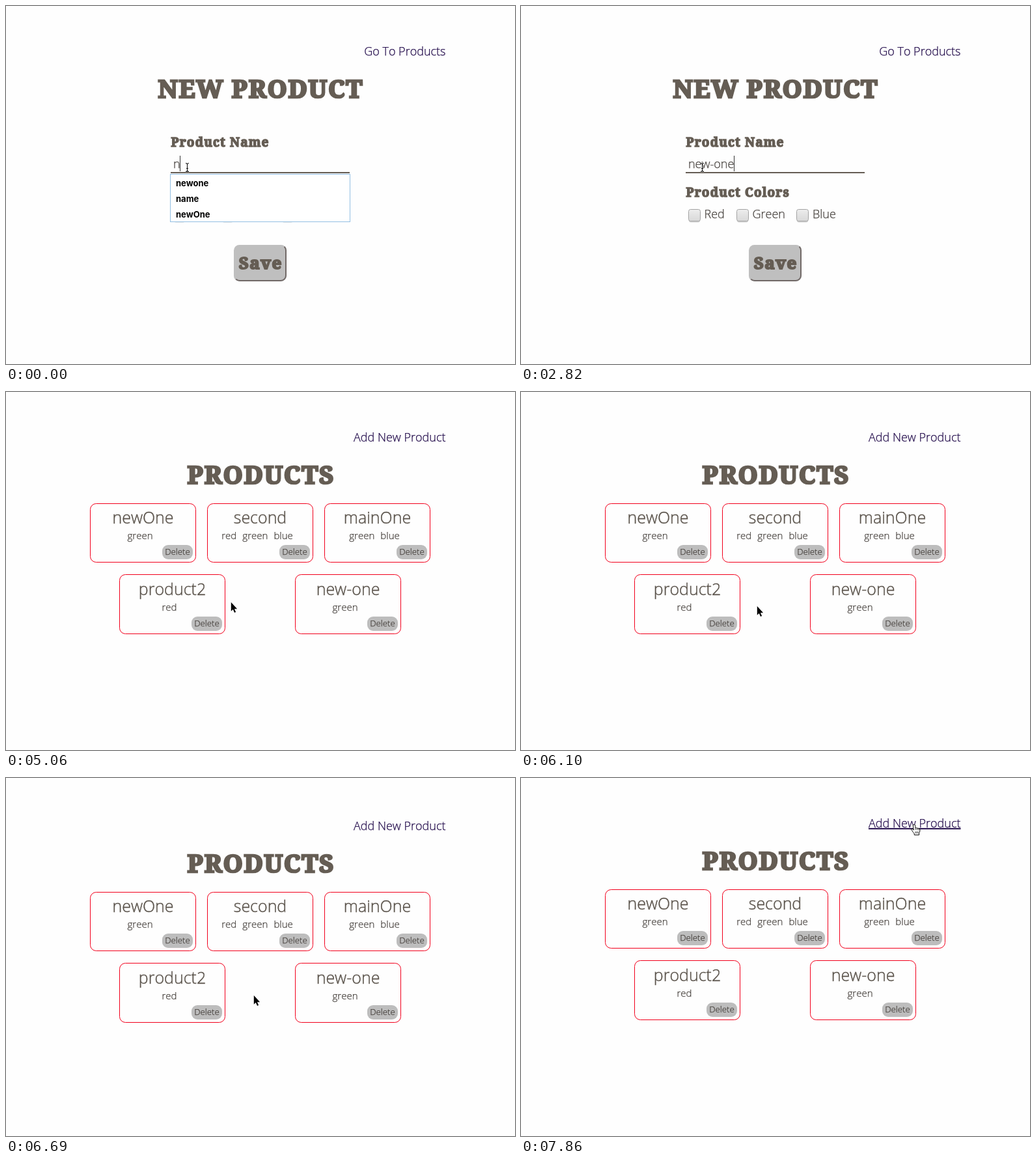
An HTML page for the animation above (8 s loop, 782 px wide and 550 px high).

```html
<!DOCTYPE html>
<html lang="en">
<head>
<meta charset="utf-8">
<title>Product form</title>
<style>
  html, body { margin: 0; width: 100%; height: 100%; overflow: hidden; background: #fefefe; }
  svg { display: block; width: 782px; height: 550px; }
  text { font: 300 18px "Open Sans", "Noto Sans", sans-serif; font-kerning: none; fill: #443f3b; stroke: #443f3b; stroke-width: .25px; }
  .slab { font-family: "Noto Serif", "Liberation Serif", serif; font-weight: 700; fill: #655d54; stroke: #655d54; }
  .head { font-size: 38.5px; stroke-width: 2.7px; letter-spacing: 1.6px; text-anchor: middle; }
  .label { font-size: 19px; stroke-width: 1.5px; letter-spacing: 1.15px; }
  .save { font-size: 26px; stroke-width: 2.1px; letter-spacing: 1.4px; text-anchor: middle; }
  .link { fill: #210a4a; stroke: #210a4a; text-anchor: end; }
  .link.hover { text-decoration: underline; }
  .item { font: 700 13px Inter, "Liberation Sans", sans-serif; fill: #000; stroke: none; }
  .title { font-size: 25px; fill: #5c554d; stroke: #5c554d; stroke-width: .45px; text-anchor: middle; }
  .tags { font-size: 15px; word-spacing: 5.2px; text-anchor: middle; }
  .delete { font-size: 13.3px; text-anchor: middle; }
  .card { fill: none; stroke: #f2001c; }
</style>
</head>
<body>
<svg viewBox="0 0 782 550">
  <defs>
    <linearGradient id="shade" x2="0" y2="1">
      <stop stop-color="#eee"/>
      <stop offset=".5" stop-color="#e2e2e2"/>
      <stop offset="1" stop-color="#d9d9d9"/>
    </linearGradient>
    <g id="box">
      <rect x="1" y="2" width="17" height="18.5" rx="3" fill="#d2d2d2"/>
      <rect x=".5" y=".5" width="18" height="18" rx="3" fill="url(#shade)" stroke="#a3a3a3"/>
    </g>
  </defs>

  <g id="form">
    <text class="link" x="675.5" y="76">Go To Products</text>
    <text class="slab head" x="391.3" y="140.7">NEW PRODUCT</text>
    <text class="slab label" x="253.5" y="216.3">Product Name</text>
    <text id="field" x="257" y="249"></text>
    <rect id="caret" y="230" width="1" height="24" fill="#333"/>
    <rect x="253" y="255" width="275" height="2" fill="#655d54"/>
    <text class="slab label" x="253.5" y="293.3">Product Colors</text>
    <use href="#box" x="257" y="312"/>
    <use href="#box" x="331" y="312"/>
    <use href="#box" x="423" y="312"/>
    <path id="tick" d="M334.7 321.3l4 4.2 7.8-10" fill="none" stroke="#3d3d3d" stroke-width="3.4"/>
    <text x="281.5" y="326">Red</text>
    <text x="355.5" y="326">Green</text>
    <text x="448" y="326">Blue</text>
    <rect x="350" y="367" width="81" height="56" rx="8.5" fill="#bfbfbf"/>
    <path d="M427.6 369.7A8 8 0 0 1 430 375.5V414a8 8 0 0 1-8 8H359a8 8 0 0 1-5.7-2.4" fill="none" stroke="#716967" stroke-width="2"/>
    <text class="slab save" x="391.2" y="403.5">Save</text>
    <g id="menu">
      <rect id="panel" x="252.5" y="258.5" width="276" fill="#fff" stroke="#93bfe3"/>
      <text class="item" x="261" y="277">newone</text>
      <text class="item" id="extra" x="261" y="301">name</text>
      <text class="item" id="last" x="261">newOne</text>
    </g>
  </g>

  <g id="list">
    <text class="link" id="add" x="675.5" y="76">Add New Product</text>
    <text class="slab head" x="391.8" y="140.7">PRODUCTS</text>
    <g id="cards"></g>
  </g>

  <path id="arrow" d="M.8 1V14.8l3-2.8 2.2 4.9 2.1-1-2.2-4.7h4.2Z" stroke="#fff" stroke-width="1.4" paint-order="stroke"/>
  <g id="beam" fill="none">
    <path d="M-2.5-6.5Q0-6.5 0-4.5Q0-6.5 2.5-6.5M0-5V5M-2.5 6.5Q0 6.5 0 4.5Q0 6.5 2.5 6.5M-1.5 1.5h3" stroke="#fff" stroke-width="2.4" opacity=".7"/>
    <path d="M-2.5-6.5Q0-6.5 0-4.5Q0-6.5 2.5-6.5M0-5V5M-2.5 6.5Q0 6.5 0 4.5Q0 6.5 2.5 6.5M-1.5 1.5h3" stroke="#111" stroke-width="1.1"/>
  </g>
  <g id="hand" stroke="#111" stroke-linejoin="round" stroke-linecap="round">
    <path d="M-1.6 1.6Q-1.4 .4 0 .5Q1.4 .6 1.6 2L2.1 6Q3.5 4.9 4.6 6.3Q6 5.5 7 7Q8.6 6.5 9 8.2Q9.3 11 7.6 13.5V16.5H.2V14.6Q-1.5 12.6-3 10Q-5 8.2-4.2 7.4Q-3 6.6-1 8.6Z" fill="#fff"/>
    <path d="M2.1 6v2.6M4.6 6.3v2.4M7 7v2M2 11.5v2.5M4 11.5v2.5M6 11.5v2.5" fill="none" stroke-width=".8"/>
  </g>
</svg>
<script>
const LOOP = 8000;
const el = id => document.getElementById(id);
const show = (id, on) => { el(id).style.display = on ? "" : "none"; };
const move = (id, x, y) => el(id).setAttribute("transform", `translate(${x} ${y})`);
const within = (t, a, b) => t >= a && t < b;

const WORD = "new-one";
const KEYS = [0, 440, 890, 1640, 2380, 2680, 2820];
const BLINKS = [[1490, 1640], [2230, 2380], [3420, 4010], [4310, LOOP]];

// Pointer strokes: start, end and the place held at each even step.
const STROKES = [
  [3420, 4460, [[278, 248], [292, 249], [326, 250], [364, 272], [377, 296], [366, 315], [349, 322], [345, 322]]],
  [5950, 6980, [[350, 323], [362, 328], [374, 332], [380, 333], [380, 333], [380, 333], [380, 333], [380, 333]]],
  [7130, 7860, [[388, 322], [424, 278], [486, 204], [552, 132], [592, 90], [604, 70]]]
];
const BOUNCE = [0, 0, 1, 2, 3, 4, 2, 0];

function stepOf([from, to, points], t) {
  const n = points.length - 1;
  return Math.min(n, Math.floor((t - from) / (to - from) * n + 1e-6));
}

function pointer(t) {
  let at = [278, 248];
  for (const s of STROKES) if (t >= s[0]) at = s[2][stepOf(s, t)];
  return at;
}

function card(x, top, bottom, title, tags) {
  const mid = x + 81.5;
  return `<rect class="card" x="${x + .5}" y="${top + .5}" width="162" height="${bottom - top - 1}" rx="9"/>
    <text class="title" x="${mid}" y="${bottom - 60}">${title}</text>
    <text class="tags" x="${mid - 4.5}" y="${bottom - 36}">${tags}</text>
    <rect x="${x + 111}" y="${bottom - 27}" width="47" height="22" rx="9" fill="#bdbdbd"/>
    <text class="delete" x="${x + 134.5}" y="${bottom - 12}">Delete</text>`;
}

el("cards").innerHTML =
  card(129, 171, 262, "newOne", "green") +
  card(309, 171, 262, "second", "red green blue") +
  card(489, 171, 262, "mainOne", "green blue") +
  card(174, 280, 372, "product2", "red") +
  card(444, 280, 372, "new-one", "green");

function drawForm(t) {
  const field = el("field");
  field.textContent = WORD.slice(0, KEYS.filter(k => t >= k).length);
  el("caret").setAttribute("x", Math.floor(257.3 + field.getComputedTextLength()));
  show("caret", !BLINKS.some(([a, b]) => within(t, a, b)));
  show("tick", t >= 4460);

  const full = t < 440;
  show("menu", t < 1640);
  show("extra", full);
  el("panel").setAttribute("height", full ? 73 : 49);
  el("last").setAttribute("y", full ? 325 : 301);
}

function draw(t) {
  const onForm = t < 5060, onLink = t >= 7860;
  const [x, y] = pointer(t);
  const onField = onForm && y < 256;
  show("form", onForm);
  show("list", !onForm);
  if (onForm) drawForm(t);

  const scroll = within(t, 5950, 7130) ? BOUNCE[stepOf(STROKES[1], t)] : 0;
  move("list", 0, scroll);
  el("add").classList.toggle("hover", onLink);

  show("beam", onField);
  show("hand", onLink);
  show("arrow", !onField && !onLink);
  move("beam", x + .5, y);
  move("hand", x, y + 1);
  move("arrow", x, y);
}

function tick(now) {
  draw(now % LOOP);
  requestAnimationFrame(tick);
}
draw(0);
requestAnimationFrame(tick);
</script>
</body>
</html>
```
